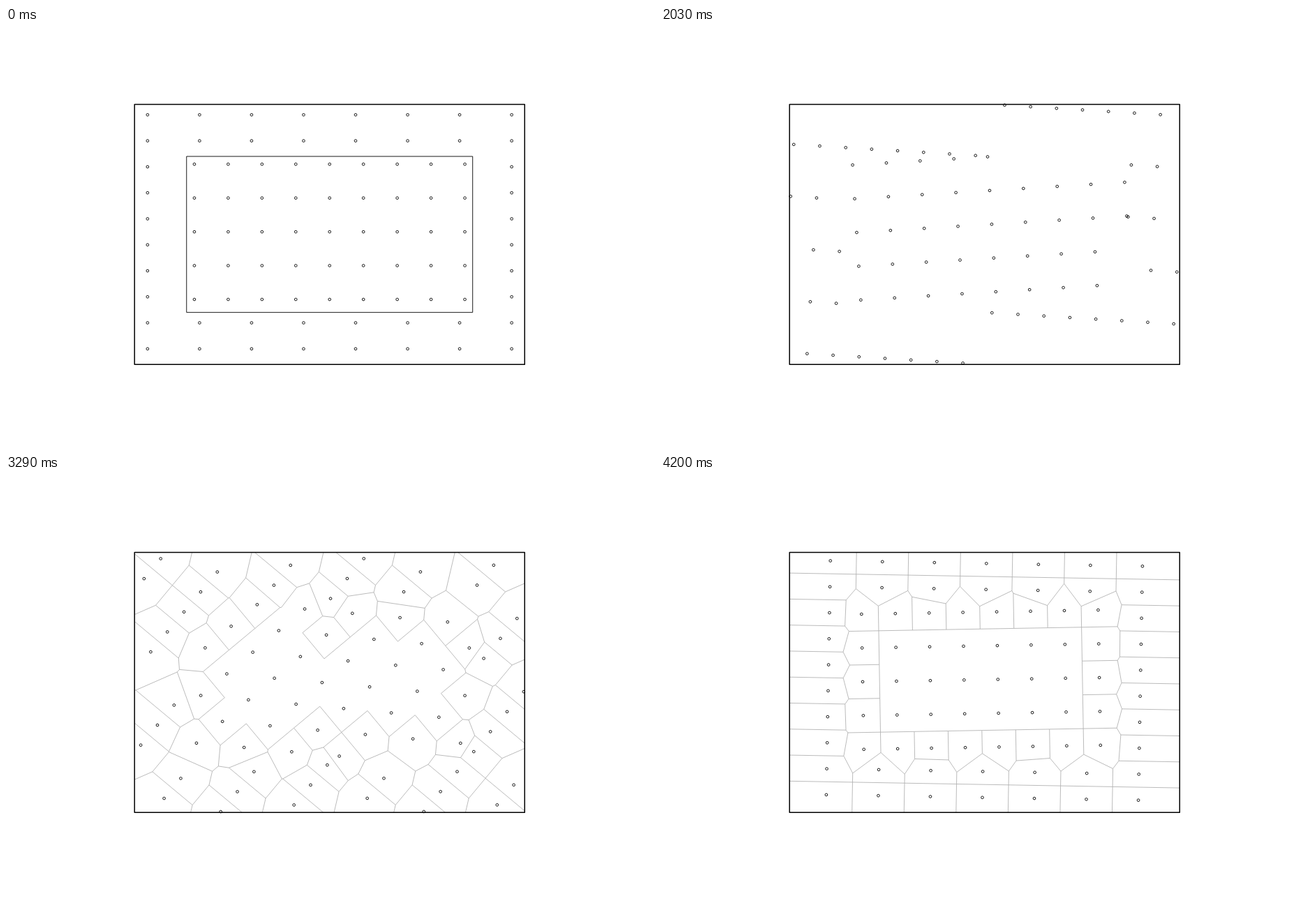
These frames come from a looping animation (930 by 602 pixels, 4270 ms). An HTML page with a canvas:

```html
<!DOCTYPE html>
<html lang="en">
<head>
<meta charset="utf-8">
<title>Rotating sampling grids</title>
<style>
html, body { margin: 0; width: 100%; height: 100%; overflow: hidden; background: #fff; }
canvas { display: block; width: 930px; height: 602px; }
</style>
</head>
<body>
<canvas id="stage" width="930" height="602"></canvas>
<script>
const ctx = document.getElementById('stage').getContext('2d');
const STEP = 70, STEPS = 61, HIDE_INNER = 20, SHOW_CELLS = 40;

// World units: a 15 x 10 box, y up.
const SCALE = 37.27, LEFT = 184.2, BOTTOM = 482.2;
const px = x => LEFT + x * SCALE;
const py = y => BOTTOM - y * SCALE;

const BOX = { x0: 0, y0: 0, x1: 15, y1: 10 };
const CORE = { x0: 2, y0: 2, x1: 13, y1: 8 };
const COARSE = { cx: 6, cy: 5.6, ox: 0.5, oy: 0, dx: 2, dy: 1, dir: 1 };
const FINE = { cx: 7.1, cy: 5.75, ox: 0.4, oy: -0.65, dx: 1.3, dy: 1.3, dir: -1 };
const FULL_AREA = FINE.dx * FINE.dy;

const inside = (p, r) => p.x > r.x0 && p.x < r.x1 && p.y > r.y0 && p.y < r.y1;

const angleAt = i => i * (i < HIDE_INNER ? 2.95 : 179 / 60) * Math.PI / 180;

function lattice(g, angle, keep) {
  const c = Math.cos(angle), s = Math.sin(angle) * g.dir, pts = [];
  for (let m = -14; m <= 14; m++) {
    for (let n = -14; n <= 14; n++) {
      const a = g.ox + m * g.dx, b = g.oy + n * g.dy;
      const p = { x: g.cx + a * c - b * s, y: g.cy + a * s + b * c };
      if (keep(p)) pts.push(p);
    }
  }
  return pts;
}

// Each vertex carries the neighbour across the edge that starts there (-1: the box).
function cellOf(i, pts) {
  const p = pts[i];
  let poly = [[0, 0], [15, 0], [15, 10], [0, 10]].map(([x, y]) => ({ x, y, nb: -1 }));
  pts.forEach((q, j) => {
    if (j === i) return;
    const nx = q.x - p.x, ny = q.y - p.y;
    const lim = (q.x * q.x + q.y * q.y - p.x * p.x - p.y * p.y) / 2;
    const side = v => v.x * nx + v.y * ny - lim;
    const next = [];
    poly.forEach((a, k) => {
      const b = poly[(k + 1) % poly.length], sa = side(a), sb = side(b);
      if (sa <= 0) next.push(a);
      if ((sa <= 0) !== (sb <= 0)) {
        const t = sa / (sa - sb);
        next.push({
          x: a.x + (b.x - a.x) * t,
          y: a.y + (b.y - a.y) * t,
          nb: sa <= 0 ? j : a.nb
        });
      }
    });
    poly = next;
  });
  return poly;
}

const area = poly => poly.reduce((sum, a, k) => {
  const b = poly[(k + 1) % poly.length];
  return sum + (a.x * b.y - b.x * a.y) / 2;
}, 0);

// Fine cells of the regular size stay without an outline.
function drawCells(outer, inner) {
  const pts = outer.concat(inner);
  const cells = pts.map((_, i) => cellOf(i, pts));
  const shown = cells.map((cell, i) =>
    i < outer.length || Math.abs(area(cell) - FULL_AREA) > 0.005);
  ctx.strokeStyle = '#aaa';
  ctx.lineWidth = 0.8;
  ctx.beginPath();
  cells.forEach((cell, i) => {
    cell.forEach((a, k) => {
      if (a.nb <= i || !(shown[i] || shown[a.nb])) return;
      const b = cell[(k + 1) % cell.length];
      ctx.moveTo(px(a.x), py(a.y));
      ctx.lineTo(px(b.x), py(b.y));
    });
  });
  ctx.stroke();
}

function drawRect(r, width) {
  ctx.strokeStyle = '#000';
  ctx.lineWidth = width;
  ctx.lineJoin = 'round';
  ctx.strokeRect(px(r.x0), py(r.y1), (r.x1 - r.x0) * SCALE, (r.y1 - r.y0) * SCALE);
}

function drawDots(pts) {
  ctx.strokeStyle = '#000';
  ctx.lineWidth = 0.9;
  for (const p of pts) {
    ctx.beginPath();
    ctx.arc(px(p.x), py(p.y), 1.85, 0, 2 * Math.PI);
    ctx.stroke();
  }
}

function draw(i) {
  const angle = angleAt(i);
  const outer = lattice(COARSE, angle, p => inside(p, BOX) && !inside(p, CORE));
  const inner = lattice(FINE, angle, p => inside(p, CORE));
  ctx.fillStyle = '#fff';
  ctx.fillRect(0, 0, 930, 602);
  if (i >= SHOW_CELLS) drawCells(outer, inner);
  if (i < HIDE_INNER) drawRect(CORE, 0.9);
  drawRect(BOX, 1.5);
  drawDots(outer);
  drawDots(inner);
}

const start = performance.now();
let last = -1;
function tick() {
  const i = Math.floor((performance.now() - start) / STEP) % STEPS;
  if (i !== last) draw(last = i);
  requestAnimationFrame(tick);
}
tick();
</script>
</body>
</html>
```
